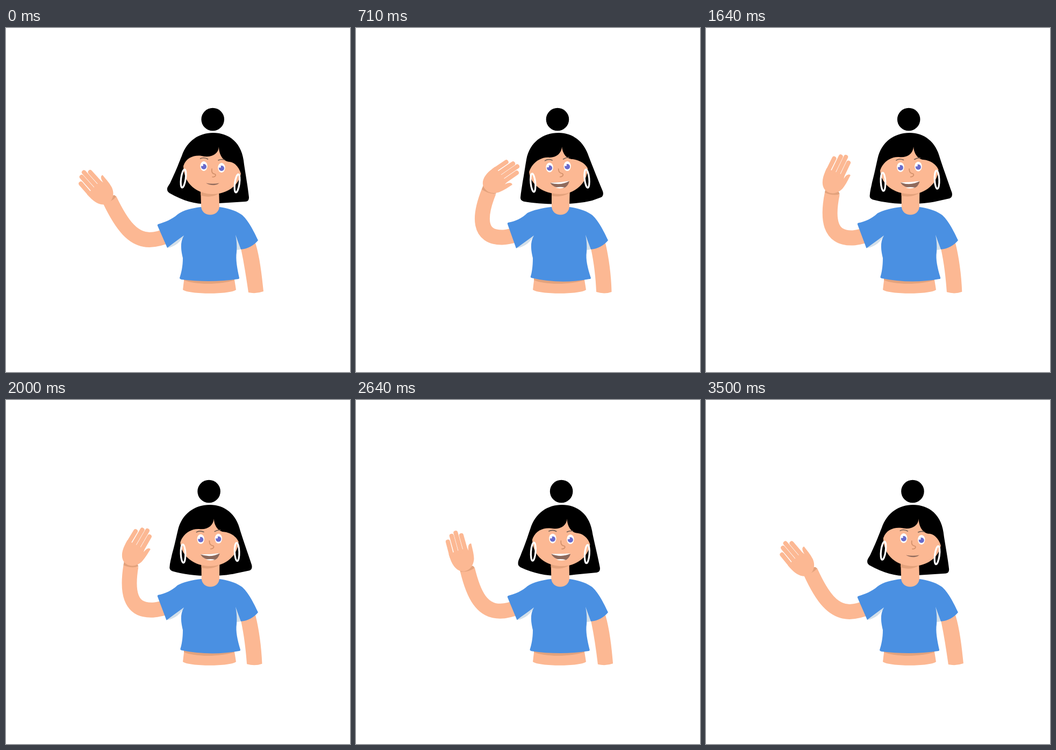
Recreate the animation shown at these times as an HTML page. Size 640 by 640 pixels, loop 3.57 s.

```html
<!DOCTYPE html>
<html lang="en">
<head>
<meta charset="utf-8">
<title>Waving woman</title>
<style>
  html, body { margin: 0; width: 100%; height: 100%; overflow: hidden; background: #fff; }
  svg { display: block; width: 100vw; height: 100vh; }
  .skin { fill: #fcb893; }
  .shade { fill: #e3a27c; }
  .shirt { fill: #4a90e2; }
  .under { fill: #d3dfe9; }
  .lips { fill: #8f6a5c; }
  .white { fill: #fff; }
  .iris { fill: #6a6bcb; }
  .limb { fill: none; stroke: #fcb893; stroke-width: 28; }
  .finger { fill: none; stroke: #fcb893; stroke-width: 8.2; stroke-linecap: round; }
  .brow { fill: none; stroke: #6f5d52; stroke-width: 1.6; stroke-linecap: round; }
  .nose { fill: none; stroke: #d08e68; stroke-width: 1.6; stroke-linecap: round; }
  .hoop { fill: none; stroke: #fff; stroke-width: 3.3; }
</style>
</head>
<body>
<svg viewBox="0 0 640 640" id="stage"></svg>
<script>
const LOOP = 3570, STEP = LOOP / 50;
const stage = document.getElementById('stage');

// [time, value] keys; value 0 = arm out, 1 = arm in
const ARM = [[0, 0], [595, 1], [1165, 0], [1785, 1], [2355, 0], [2950, 1], [3570, 0]];
const HAND = [[0, -45], [600, 52], [890, 52], [1212, -45], [1800, 52], [2355, -45], [2940, 52], [3555, -45], [3570, -45]];
const MOUTH = [[0, 0], [100, 0], [350, 1], [3200, 1], [3430, 0], [3570, 0]];

const ease = u => u < .5 ? 2 * u * u : 1 - 2 * (1 - u) * (1 - u);

function valueAt(keys, t) {
  let i = 1;
  while (i < keys.length - 1 && t > keys[i][0]) i++;
  const [t0, a] = keys[i - 1], [t1, b] = keys[i];
  return a + (b - a) * ease(Math.min(1, (t - t0) / (t1 - t0)));
}

// Blend two strings that share the same layout of numbers
const NUM = /-?\d+(\.\d+)?/g;
function mix(a, b, k) {
  const to = b.match(NUM);
  let i = 0;
  return a.replace(NUM, n => (+n + (to[i++] - n) * k).toFixed(2));
}

function add(tag, cls, attrs, parent = stage) {
  const el = document.createElementNS('http://www.w3.org/2000/svg', tag);
  if (cls) el.setAttribute('class', cls);
  for (const key in attrs) el.setAttribute(key, attrs[key]);
  parent.appendChild(el);
  return el;
}

const moving = [];
function morph(cls, out, inn = out) {
  const el = add('path', cls, { d: out });
  if (out !== inn) moving.push(k => el.setAttribute('d', mix(out, inn, k)));
  return el;
}
function slide(tag, cls, attrs, out, inn) {
  const el = add(tag, cls, attrs);
  moving.push(k => el.setAttribute('transform', mix(out, inn, k)));
  return el;
}

// Hair
slide('circle', '', { r: 21.3 }, 'translate(384.7 170)', 'translate(374.8 170)');
morph('',
  'M300 301 C299 296 304 292 306 287 C317 264 322 250 327 238 C337 209 360 195 385 195 C415 195 440 213 443 254 C446 274 450 296 452 315 C452 320 450 323 445 323 L397 326 C365 330 339 327 304 307 Q300 304 300 301Z',
  'M306 316 C307 305 309 295 310 287 C313 270 315 255 317 244 C323 213 347 195 377 195 C403 195 424 211 433 239 C441 260 451 284 459 303 C461 308 460 313 456 315 L440 321 C405 330 345 329 312 323 Q306 321 306 316Z');

// Resting arm and waist
morph('skin',
  'M437 410 C443 438 447 465 451 492 Q465 495 479 490 C476 460 472 425 464 400Z',
  'M437 410 C443 438 446 465 447 491 Q462 496 475.5 491 C475 460 470 425 464 400Z');
morph('skin', 'M332 462 L329 487 C340 496 418 496 428 487 L424 462Z');
morph('shade', 'M331 469 C350 478 400 478 425 469 L425 460 L331 460Z');

// Waving arm
morph('limb',
  'M306 384 C290 391 278 394 267 394 C237 394 216 368 193 320',
  'M306 383 C290 387 280 389.5 272 389.5 C228 390 228 352 248 304');
slide('path', 'shade', { d: 'M-14 0 Q0 5 14 0 L12 -4 L-13 -13Z' },
  'translate(193 320) rotate(-27)', 'translate(248 304) rotate(18)');

const hand = add('g');
add('path', 'skin', {
  d: 'M-25 -31 C-26 -14 -20 2 -6 3 C8 4 15 -8 17 -14 C20 -24 20 -34 21 -42 C16 -44 13 -38 12 -31 L11 -37 L-25 -37Z'
}, hand);
for (const d of ['M-21 -31 L-19 -59', 'M-11 -34 L-9 -67', 'M-2 -34 L0 -70', 'M7 -34 L8.5 -62'])
  add('path', 'finger', { d }, hand);

// Shirt
morph('under', 'M299 408 L331 386 C326 397 314 407 301 409Z');
morph('under', 'M426 384 L429 413 Q434 413 438 411Z');
morph('shirt',
  'M363 333 C346 335 329 339 319 347 C309 356 296 361 283 365 Q281 366 282 368 L300 409 C310 401 320 394 331 386 C323 399 326 415 329 428 C329 444 326 456 323 465 Q323 467 327 468 C362 472 398 472 432 467 Q434 467 434 465 C430 447 427 430 429 417 C430 406 429 394 427 385 L437 412 C450 411 462 404 469 395 C461 378 450 356 438 347 C425 338 410 335 397 333Z',
  'M363 333 C346 335 329 339 319 344 C309 354 296 360 283 362 Q281 363 282 365 L298 410 C309 402 320 394 331 386 C323 399 326 415 329 428 C329 444 327 456 325 462 Q324 464 327 465 C362 473 398 474 434 467 Q437 467 437 465 C431 447 427 430 429 417 C430 406 429 394 427 385 L437 412 C450 411 462 404 469 395 C461 378 450 356 438 347 C425 338 410 335 397 333Z');

// Neck and face
morph('skin',
  'M362 296 L363 331 C363 353 397 353 397 331 L396 296Z',
  'M364 296 L364 331 C364 353 397 353 397 331 L398 296Z');
morph('shade',
  'M362 298 L362 311 C372 315 386 315 396 308 L396 298Z',
  'M364 298 L364 312 C374 315 388 313 398 306 L398 298Z');
morph('skin',
  'M330 257 C335 241 350 236 364 238 C380 242 395 236 396 221 C396 235 404 249 416 249 C426 250 434 260 437 271 C433 294 410 309 385 309 C356 309 331 291 330 257Z',
  'M322 268 C327 251 344 239 360 241 C373 241 382 233 383 221 C384 234 392 244 403 244 C417 246 427 253 431 261 C430 288 408 309 379 309 C348 309 324 291 322 268Z');

// Earrings
const hoop = { rx: 4.3, ry: 17 };
slide('ellipse', 'hoop', hoop, 'translate(330 280) rotate(8)', 'translate(329.3 288) rotate(-6)');
slide('ellipse', 'hoop', hoop, 'translate(430 289) rotate(8)', 'translate(429.5 280) rotate(-6)');

// Eyes
function eye(out, inn) {
  const parts = [['white', 0, 0, 6.7, 9], ['iris', 0, 1, 5, 5], ['white', -3, -2, 2, 2]];
  for (const [cls, cx, cy, rx, ry] of parts)
    slide('ellipse', cls, { cx, cy, rx, ry }, out, inn);
}
eye('translate(368 257)', 'translate(360 259.5)');
eye('translate(401 260)', 'translate(393 257)');

morph('brow', 'M361.5 243 Q369 239.5 375.5 244', 'M351.5 247 Q357 243 365 246');
morph('brow', 'M395 246 Q400 243.5 406 245', 'M385.5 244 Q390 241 396 240.5');
morph('nose',
  'M383 262 C382 270 385 271 389 272 C392 274 388 278 384 277',
  'M376.5 262 C377 269 380 270 384 271 C387 273 384 277 379.5 277');

// Mouth: [class, closed, open with arm out, open with arm in]
const mouth = [
  ['lips',
    'M372 288.5 Q385 291 397 288.5 Q394 291 389 292 Q379 293 372 288.5Z',
    'M364 286 Q382 287 400 287 Q396 297 390 298 Q370 298 364 286Z',
    'M361 288 Q380 287 397 285 Q394 295 387 297.5 Q368 299 361 288Z'],
  ['white',
    'M374 289.5 Q385 290 395 289.5 Q385 290 374 289.5Z',
    'M364 285.5 Q382 286.5 400 286 Q382 294 364 285.5Z',
    'M361 288 Q380 287.5 397 284.5 Q381 294 361 288Z'],
  ['white',
    'M378 291 Q385 291 390 291 Q385 291 378 291Z',
    'M373 296.5 Q382 295 391 297.5 Q382 300 373 296.5Z',
    'M371 297 Q380 295 388 296.5 Q380 300 371 297Z']
].map(([cls, shut, out, inn]) => ({ el: add('path', cls), shut, out, inn }));

function draw(t) {
  const k = valueAt(ARM, t), open = valueAt(MOUTH, t);
  for (const move of moving) move(k);
  const pivot = mix('translate(194.5 318)', 'translate(245.5 300.5)', k);
  hand.setAttribute('transform', `${pivot} rotate(${valueAt(HAND, t).toFixed(2)})`);
  for (const { el, shut, out, inn } of mouth)
    el.setAttribute('d', mix(mix(shut, out, open), mix(shut, inn, open), k));
}

const start = performance.now();
function tick() {
  const t = (performance.now() - start) % LOOP;
  draw(Math.floor(t / STEP) * STEP);
  requestAnimationFrame(tick);
}
tick();
</script>
</body>
</html>
```
